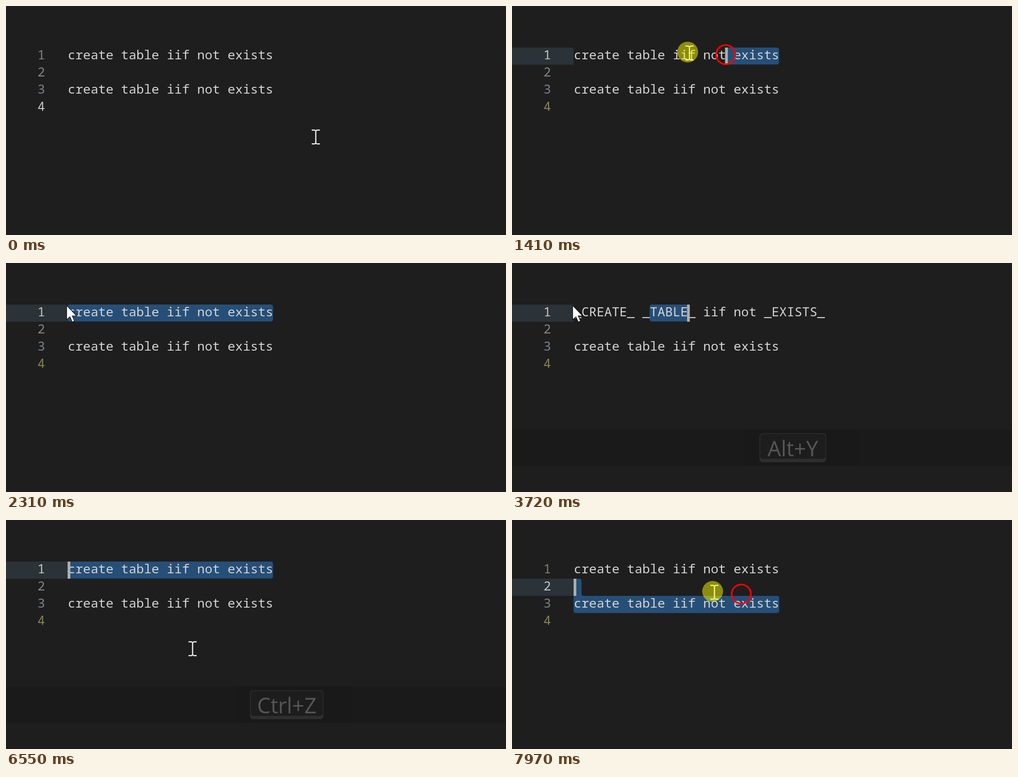
Write an HTML page that moves like this. It is 1104 px wide and 507 px high and loops after 8 s.

```html
<!DOCTYPE html>
<html lang="en">
<head>
<meta charset="utf-8">
<title>Editor case change</title>
<style>
  html, body { margin: 0; width: 100%; height: 100%; overflow: hidden; background: #1e1e1e; }
  svg { display: block; width: 1104px; height: 507px; }
  .code { font: 28px "Noto Sans Mono", monospace; fill: #d4d4d4; }
  .key { font: 47px "Open Sans", "Noto Sans", sans-serif; fill: #eee; text-anchor: middle; }
</style>
</head>
<body>
<svg viewBox="0 0 1104 507">
  <rect width="1104" height="507" fill="#1e1e1e"/>
  <rect id="band" width="136" height="38" fill="#2b3238"/>
  <path id="selection" fill="#264f78"/>
  <g class="code">
    <g id="numbers"></g>
    <text id="first" x="136.5" y="118"></text>
    <text x="136.5" y="194">create table iif not exists</text>
  </g>
  <rect id="caret" width="6" height="38" fill="#aeafad"/>
  <g id="overlay">
    <rect y="369" width="1104" height="80" fill="#0f0f0f"/>
    <rect id="keyBase" y="377" height="64" rx="7" fill="#5c5c5c"/>
    <rect id="keyTop" y="378.5" height="55" rx="6" fill="#1b1b1b"/>
    <text id="keyText" class="key" x="620" y="428"></text>
  </g>
  <path id="beam" d="M-9-15.3H-2.5L0-13.5L2.5-15.3H9M0-14V14M-9 15.3H-2.5L0 13.5L2.5 15.3H9"
        fill="none" stroke="#f0f0f0" stroke-width="2.6"/>
  <path id="arrow" d="M0 0V31.5L7.2 25L12.2 36.5L17.2 34.3L12.2 23.2H22Z"
        fill="#fff" stroke="#111" stroke-width="1.3"/>
  <circle id="glow" r="23" fill="#ff0" opacity=".49"/>
  <circle id="ring" r="21.2" fill="none" stroke="#f00" stroke-width="3.6"/>
</svg>
<script>
const LOOP = 8000, TICK = 100.4, BLINK = 505;
const LEFT = 136.5, CELL = 16.8, TOP = 92, LINE = 38;
const LOWER = 'create table iif not exists';
const UPPER = '_CREATE_ _TABLE_ iif not _EXISTS_';

// moments of the story, in ticks
const PRESS = 13, RELEASE = 21, CHANGE = 37, LEAVE = 46, UNDO = 65, PRESS_AGAIN = 77;
const KEY_TICKS = 8;

const home = { x: 684, y: 290 };
const moves = [
  { from: 0, to: 7, x: 608, y: 84 },
  { from: 8, to: 10, x: 608, y: 102 },
  { from: 12, to: PRESS, x: 608, y: 114 },
  { from: PRESS, to: 19, x: 130, y: 92 },
  { from: 20, to: 23, x: 134, y: 94 },
  { from: 45, to: 48, x: 404, y: 286 },
  { from: 49, to: 50, x: 394, y: 284 },
  { from: 52, to: 57, x: 412, y: 285 },
  { from: 68, to: 72, x: 635, y: 206 },
  { from: 72, to: 76, x: 602, y: 195 },
  { from: 77, to: 78, x: 607, y: 171 },
  { from: 78, to: 79, x: 447, y: 160 }
];

const $ = id => document.getElementById(id);
const clamp = (v, lo, hi) => Math.min(hi, Math.max(lo, v));
const mix = (a, b, p) => ({ x: a.x + (b.x - a.x) * p, y: a.y + (b.y - a.y) * p });
const easeOut = p => 1 - (1 - p) ** 3.3;
const within = (k, from, to) => k >= from && k < to;
const lineY = line => TOP + (line - 1) * LINE;
const columnX = col => LEFT + col * CELL;
const set = (el, attrs) => Object.entries(attrs).forEach(([k, v]) => el.setAttribute(k, v));
const show = (el, visible) => el.setAttribute('visibility', visible ? 'visible' : 'hidden');
const place = (el, x, y) => el.setAttribute('transform', `translate(${x} ${y})`);

const numbers = [1, 2, 3, 4].map(n => {
  const el = document.createElementNS('http://www.w3.org/2000/svg', 'text');
  set(el, { x: 69.6, y: lineY(n) + 26 });
  el.textContent = n;
  return $('numbers').appendChild(el);
});

const pointerAt = k => moves.reduce(
  (pos, m) => mix(pos, m, easeOut(clamp((k - m.from) / (m.to - m.from), 0, 1))), home);

// clicks and drag selection trail behind the pointer
const trailAt = k => mix(pointerAt(k - 1), pointerAt(k), .63);

function editorAt(k) {
  if (k < PRESS) return { line: 4, caret: 0, from: 0, to: 0 };
  if (within(k, CHANGE, UNDO)) return { line: 1, caret: 15, from: 10, to: 15 };
  if (within(k, UNDO, PRESS_AGAIN)) return { line: 1, caret: 0, from: 0, to: LOWER.length };
  const { x, y } = trailAt(k);
  const line = Math.floor((y - TOP) / LINE) + 1;
  const column = Math.round((x - LEFT) / CELL);
  const caret = clamp(column, 0, line === 2 ? 0 : LOWER.length);
  return { line, caret, from: caret, to: LOWER.length };
}

function selectionPath({ line, from, to }) {
  if (line === 2) {
    return 'M141 130H149Q153.5 130 153.5 135V163Q153.5 168 158 168H585Q590 168 590 173' +
      'V201Q590 206 585 206H141Q136 206 136 201V135Q136 130 141 130Z';
  }
  if (from === to) return '';
  const x = columnX(from) + 4.5, w = (to - from) * CELL - 10;
  return `M${x} ${lineY(line)}h${w}q5 0 5 5v27.5q0 5-5 5h${-w}q-5 0-5-5v-27.5q0-5 5-5Z`;
}

function drawEditor(t, k) {
  const state = editorAt(k), focused = k >= PRESS;
  const blinkStart = k < UNDO ? 1700 : 6550;
  const lit = Math.floor(Math.max(0, t - blinkStart) / BLINK) % 2 === 0;
  $('first').textContent = within(k, CHANGE, UNDO) ? UPPER : LOWER;
  set($('selection'), { d: selectionPath(state) });
  set($('band'), { y: lineY(state.line) });
  set($('caret'), { x: Math.max(136, columnX(state.caret) - 2), y: lineY(state.line) });
  show($('band'), focused);
  show($('caret'), focused && lit);
  numbers.forEach((el, i) => {
    const olive = focused && (i === 0 || i === 3);
    const idle = olive ? '#858258' : i === 2 ? '#7d828c' : '#858585';
    set(el, { fill: i + 1 === state.line ? (i ? '#c6c6c6' : '#cfc6b0') : idle });
  });
}

function drawOverlay(k) {
  const undo = k >= UNDO, age = k - (undo ? UNDO : CHANGE);
  const width = undo ? 162 : 147, x = 620 - width / 2;
  show($('overlay'), within(age, 0, KEY_TICKS));
  set($('overlay'), { opacity: clamp(.27 + .365 * age, 0, 1) });
  set($('keyBase'), { x, width });
  set($('keyTop'), { x: x + 1.5, width: width - 3 });
  $('keyText').textContent = undo ? 'Ctrl+Z' : 'Alt+Y';
}

function drawPointer(k) {
  const { x, y } = pointerAt(k), trail = trailAt(k);
  const arrow = within(k, RELEASE, LEAVE);
  const pressed = within(k, PRESS, RELEASE) || k >= PRESS_AGAIN;
  show($('arrow'), arrow);
  show($('beam'), !arrow);
  show($('glow'), pressed);
  show($('ring'), pressed);
  place($('arrow'), x, y);
  place($('beam'), x, y);
  place($('glow'), x - 4, y - 2);
  place($('ring'), trail.x, trail.y);
}

const start = performance.now();
function frame(now) {
  const t = Math.max(0, now - start) % LOOP;
  const k = Math.floor(t / TICK);
  drawEditor(t, k);
  drawOverlay(k);
  drawPointer(k);
  requestAnimationFrame(frame);
}
frame(start);
</script>
</body>
</html>
```
